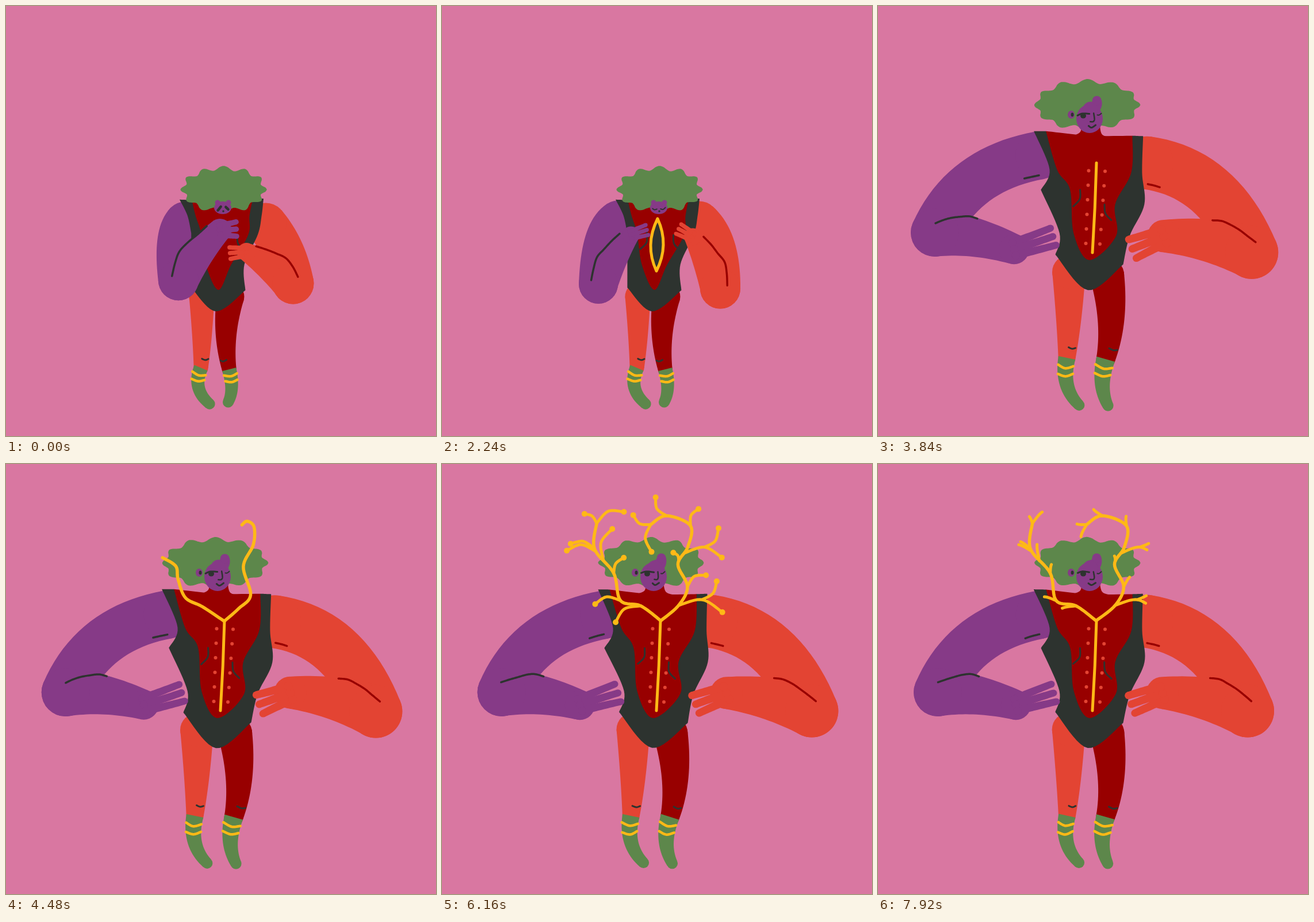
Recreate the animation shown at these times as an HTML page with a canvas. Size 748 px wide and 748 px high, loop 8 s.

```html
<!DOCTYPE html>
<html lang="en">
<head>
<meta charset="utf-8">
<title>Unzipped</title>
<style>
html, body { margin: 0; width: 100%; height: 100%; overflow: hidden; background: #d977a1; }
canvas { display: block; width: 100vw; height: 100vh; }
</style>
</head>
<body>
<canvas id="stage" width="748" height="748"></canvas>
<script>
const ctx = document.getElementById('stage').getContext('2d');
const PINK = '#d977a1', GREEN = '#5d874b', PURPLE = '#863a87', ORANGE = '#e34433',
  RED = '#980000', DARK = '#2d332f', YELLOW = '#ffb916';
const LOOP = 8000, STEP = 80;

const clamp = (v, a = 0, b = 1) => Math.min(b, Math.max(a, v));
const ramp = (t, a, b) => clamp((t - a) / (b - a));
const mix = (a, b, u) => a + (b - a) * u;
const mixPt = (a, b, u) => [mix(a[0], b[0], u), mix(a[1], b[1], u)];
const add = (a, b, k = 1) => [a[0] + b[0] * k, a[1] + b[1] * k];
const dir = angle => [Math.cos(angle), Math.sin(angle)];
const angleTo = (a, b) => Math.atan2(b[1] - a[1], b[0] - a[0]);
const range = (n, f) => Array.from({ length: n }, (_, i) => f(i));
const pts = s => s.split(' ').map(w => w.split(',').map(Number));
const poses = (...list) => list.map(pts);

// Poses: 0 hugging, 1 opening, 2 rising, 3 hands on hips
const hold = (a, c, d) => poses(a, a, c, d);

// hair centre, hair radii, face centre, face radii
const head = hold('379,319 71,37 377,351 15,11', '369,199 88,41 371,224 23,25', '364,172 88,41 368,196 23,25');
// left and right of shoulder, armpit, bust, waist, hip; then crotch
const torso = hold(
  '302,337 448,335 316,365 444,365 322,395 438,398 323,450 415,450 322,490 416,495 365,531',
  '291,262 464,259 300,310 459,305 301,350 452,345 309,405 430,405 307,457 425,463 366,508',
  '271,218 461,226 298,285 460,290 283,320 463,345 316,395 438,400 308,432 427,450 365,494');
// shoulder, bend, elbow, wrist, fingertips, (arm radius, wrist radius)
const armL = poses('312,375 290,398 300,477 372,390 401,388 35,20', '306,372 275,392 272,484 328,398 357,390 34,15',
  '292,304 213,324 210,455 300,340 328,331 44,20', '282,262 151,286 104,397 240,419 306,398 42,26');
const armR = poses('452,378 488,420 500,482 418,428 390,430 36,16', '447,374 485,407 484,492 436,402 412,388 35,15',
  '466,302 520,340 513,467 440,346 408,332 43,21', '468,274 588,292 643,430 495,398 441,418 46,28');
// hip, knee, ankle, heel, toe, (hip radius, ankle radius)
const legL = hold('341,505 342,575 339,629 323,666 354,692 22,12.5', '331,480 331,555 333,611 321,664 349,693 30,14.5',
  '332,462 333,550 329,612 318,663 350,694 29,15');
const legR = hold('391,505 376,572 388,632 398,668 387,689 24,12.5', '395,482 376,555 389,616 406,666 386,692 30,14.5',
  '398,468 414,549 396,614 382,661 400,695 30,16.5');
const zip = poses('374,415 374,415 0,0', '375,370 373,461 11,0', '378,298 371,437 0,0', '380,273 373,429 0,0');

// Each trunk bends from its sprouting to its grown form; twigs are [place, side, length]
const antlers = [
  { trunk: poses('380,273 342,248 312,233 299,200 295,178 272,163', '380,273 345,247 310,237 299,190 265,147 269,103'),
    twigs: [[1, -1, 51], [2, -1, 44], [3, 1, 32], [3.5, 1, 58], [3.9, -1, 50], [4, -1, 42], [5, -1, 27], [5, 1, 52]] },
  { trunk: poses('380,273 404,252 425,228 413,178 430,140 431,110 420,100 411,106',
      '380,273 412,246 427,213 411,175 428,145 432,107 390,90 363,105'),
    twigs: [[1, 1, 76], [2, 1, 38], [3.2, -1, 18], [3.7, 1, 64], [5, 1, 32], [6, 1, 37], [7, 1, 35], [7, -1, 48]] }];

// [time, pose, easing into it]
const soft = u => u * u * (3 - 2 * u), speedUp = u => u ** 1.6, slowDown = u => 1 - (1 - u) ** 2;
const opening = [2640, 1, soft];
const bodyKeys = [[1360, 0], [2160, 1, soft], opening, [3360, 2, speedUp], [3680, 3, slowDown]];
const armKeys = first => [[first, 0], [2200, 1, soft], opening, [3360, 2, speedUp], [3840, 3.05, soft], [4000, 3, soft]];
const armLKeys = armKeys(1360), armRKeys = armKeys(1600);

function poseAt(t, keys) {
  let [t0, v0] = keys[0];
  for (const [t1, v1, ease] of keys.slice(1)) {
    if (t < t1) return mix(v0, v1, ease(ramp(t, t0, t1)));
    [t0, v0] = [t1, v1];
  }
  return v0;
}

function morph(list, p) {
  const i = clamp(Math.floor(p), 0, list.length - 2);
  return list[i].map((a, k) => mixPt(a, list[i + 1][k], p - i));
}

// Hand-drawn shiver of every outline
let phase = 0;
const wobble = ([x, y]) => [
  x + 0.6 * Math.sin(x * 0.13 + y * 0.07 + phase),
  y + 0.5 * Math.sin(y * 0.11 - x * 0.09 + phase * 1.7)];

// Point at place v of a smooth curve through all points of the line
function along(line, v) {
  const n = line.length - 1, i = clamp(Math.floor(v), 0, n - 1), u = clamp(v - i);
  const [a, b, c, d] = [-1, 0, 1, 2].map(k => line[clamp(i + k, 0, n)]);
  return [0, 1].map(j => b[j] + u / 2 * (c[j] - a[j] +
    u * (2 * a[j] - 5 * b[j] + 4 * c[j] - d[j] + u * (3 * (b[j] - c[j]) + d[j] - a[j]))));
}

// Closed outline made of smooth runs that meet in corners
function fill(color, ...runs) {
  ctx.beginPath();
  for (const run of runs) {
    const line = run.map(wobble);
    ctx.lineTo(...line[0]);
    for (let v = 0.1; v < line.length - 0.95; v += 0.1) ctx.lineTo(...along(line, v));
  }
  ctx.fillStyle = color;
  ctx.fill();
}

// Strokes the first part of a curve and returns its end
function stroke(line, color, width, part = 1) {
  const s = line.map(wobble), end = part * (s.length - 1), count = Math.ceil(end * 10);
  ctx.beginPath();
  for (let k = 0; k <= count; k++) ctx.lineTo(...along(s, Math.min(k / 10, end)));
  ctx.strokeStyle = color;
  ctx.lineWidth = width;
  ctx.stroke();
  return along(s, end);
}

function disc([x, y], rx, color, ry = rx) {
  ctx.beginPath();
  ctx.ellipse(x, y, rx, ry, 0, 0, Math.PI * 2);
  ctx.fillStyle = color;
  ctx.fill();
}

// A tapered curve: returns the point at t, moved sideways by a share of the radius
function bone(a, k, b, ra, rb) {
  [a, k, b] = [a, k, b].map(wobble);
  return (t, side = 0) => {
    const p = mixPt(a, k, t), q = mixPt(k, b, t), r = mix(ra, rb, t) * side;
    return add(mixPt(p, q, t), dir(angleTo(p, q) + Math.PI / 2), r);
  };
}

function drawBone(at, color, flat) {
  const edge = side => range(21, i => at(i / 20, side));
  ctx.beginPath();
  [...edge(1), ...edge(-1).reverse()].forEach(p => ctx.lineTo(...p));
  ctx.fillStyle = color;
  ctx.fill();
  for (const t of flat ? [1] : [0, 1]) {
    const c = at(t), e = at(t, 1);
    disc(c, Math.hypot(e[0] - c[0], e[1] - c[1]), color);
  }
}

function drawLeg(p, leg, color, kneeSide) {
  const [hip, knee, ankle, heel, toe, [wide, thin]] = morph(leg, p);
  const limb = bone(hip, knee, ankle, wide, thin), sock = bone(ankle, heel, toe, thin, 9.5);
  drawBone(limb, color);
  stroke([0.1, 0.5, 0.85].map((s, i) => add(limb(0.86, -kneeSide * s), [0, i % 2 * 2])), DARK, 3);
  drawBone(sock, GREEN, true);
  for (const t of [0.13, 0.29]) stroke([sock(t, 0.95), sock(t + 0.05), sock(t, -0.95)], YELLOW, 4.5);
}

function makeArm(p, poseList, side) {
  const [shoulder, bend, elbow, wrist, tip, [wide, thin]] = morph(poseList, p);
  const middle = mixPt(mixPt(elbow, wrist, 0.5), bend, 0.1);
  return { p, side, wrist, tip, gap: thin * 0.6,
    upper: bone(shoulder, bend, elbow, wide, wide), fore: bone(elbow, middle, wrist, wide, thin) };
}

function drawUpper({ p, side, upper }, color, ink) {
  drawBone(upper, color);
  const part = ramp(p, 2.6, 3);
  if (part) stroke([0.03, 0.09, 0.14].map(t => upper(t, side * 0.8)), ink, 3.5, part);
}

function drawForearm({ p, side, wrist, tip, gap, fore }, color, ink) {
  drawBone(fore, color);
  const across = dir(angleTo(wrist, tip) + Math.PI / 2);
  for (const k of [-1, 0, 1]) {
    const from = add(wrist, across, k * gap * 0.7), to = add(tip, across, k * gap);
    drawBone(bone(from, mixPt(from, to, 0.5), to, gap * 0.45, gap * 0.38), color);
  }
  const reach = mix(0.9, 0.5, clamp(p - 2));
  stroke(range(6, i => {
    const t = reach * i / 5;
    return fore(t, side * Math.min(0.97, 0.4 + 1.5 * t));
  }), ink, 3.5);
}

function drawZip(p) {
  if (p < 0.03) return;
  const [top, end, [w]] = morph(zip, p), [mx, my] = mixPt(top, end, 0.5);
  const bow = 1.5 * ramp(p, 1, 2);
  ctx.beginPath();
  ctx.moveTo(...top);
  ctx.quadraticCurveTo(mx + bow + 2 * w, my, ...end);
  ctx.quadraticCurveTo(mx + bow - 2 * w, my, ...top);
  ctx.fillStyle = DARK;
  ctx.fill();
  ctx.strokeStyle = YELLOW;
  ctx.lineWidth = 5;
  ctx.stroke();
}

function drawBody(p) {
  const [shL, shR, pitL, pitR, bustL, bustR, waistL, waistR, hipL, hipR, crotch] = morph(torso, p);
  const inset = (pt, by) => add(pt, [by, 0]);
  const deep = 17 * Math.max(1, p);
  const neckL = inset(shL, 21), neckR = inset(shR, -18), cupL = inset(bustL, deep), cupR = inset(bustR, -deep);
  const navel = add(mixPt(hipL, hipR, 0.5), [0, 1]), collar = add(mixPt(neckL, neckR, 0.5), [0, 4]);
  fill(DARK, [shL, neckL], [neckL, add(collar, [0, 40]), neckR], [neckR, shR],
    [shR, pitR, bustR, waistR, hipR], [hipR, crotch, hipL], [hipL, waistL, bustL], [bustL, pitL, shL]);
  fill(RED, [neckL, collar, neckR],
    [neckR, inset(pitR, -20), cupR, inset(waistR, -24), navel, inset(waistL, 24), cupL, inset(pitL, 14), neckL]);
  for (const [cup, s] of [[cupL, 1], [cupR, -1]]) {
    stroke([[18, 0], [17, 16], [6, 28]].map(([x, y]) => add(cup, [x * s, y])), DARK, 3);
  }
  for (let i = 0; i < 6; i++) {
    const r = 3 * (i ? ramp(p, 1.6, 2) : ramp(p, 2.3, 2.7));
    const y = mix(299.5 + 24.5 * i, 286.5 + 25.3 * i, p - 2);
    disc([366.5 - i, y], r, ORANGE);
    disc([395 - 1.8 * i, y + 1], r, ORANGE);
  }
  drawZip(p);
  return collar[1];
}

function drawHair([c, [rx, ry]]) {
  const lobes = range(73, i => {
    const a = i / 72 * Math.PI * 2, puff = 4 * Math.cos(12 * a), [x, y] = dir(a);
    return add(c, [(rx + puff) * x, (ry + puff) * y]);
  });
  fill(GREEN, lobes);
}

function drawNeck(x, y) {
  fill(RED, [[x - 16, y - 26], [x - 17, y - 6], [x - 42, y + 3]], [[x - 42, y + 8], [x + 42, y + 8]],
    [[x + 42, y + 3], [x + 21, y - 3], [x + 16, y - 26]]);
}

function drawFace(p, [, , c, [rx, ry]]) {
  const ink = (s, w) => stroke(pts(s), DARK, w);
  ctx.save();
  ctx.translate(...c);
  disc([0, 0], rx, PURPLE, ry);
  if (p < 1.5) {
    disc([-9, -9], 4.5, PURPLE);
    disc([10, -9], 4.5, PURPLE);
    if (p < 0.5) {
      ink('-8,4 -3,-2', 4.5);
      ink('5,-1 9,3', 4.5);
    } else {
      ink('-10,1 -7,3 -3,2', 2);
      ink('3,2 7,3 11,0', 2);
    }
    disc([1, 6], 1.8, DARK);
  } else {
    const size = rx / 23;
    ctx.scale(size, size);
    drawBone(bone([2, -16], [14, -22], [13, -32], 13, 8), PURPLE);
    disc([-32, -7], 6, PURPLE, 7);
    disc([-30, -7], 2.5, DARK, 3.5);
    ink('-21,-6 -12,-9 0,-8', 3);
    disc([-11, -5], 5, DARK, 4.5);
    ink('13,-6 16,-6 20,-9', 2);
    ink('7,-9 8,1 6,5 1,5', 2.5);
    ink('-2,12 3,15 10,11', 3);
  }
  ctx.restore();
}

// A twig leaves along the heading and curls to one side
function drawTwig(from, heading, side, length, part, bud) {
  const way = heading + side * 1.05, tip = add(from, dir(way), length);
  const middle = add(mixPt(from, tip, 0.5), add(dir(heading), dir(way), -0.5), length * 0.25);
  const forked = length > 60, shown = forked ? Math.min(1, part * 1.5) : part;
  const end = stroke([from, middle, tip], YELLOW, 5, shown);
  if (bud > 0) disc(end, bud, YELLOW);
  if (forked && shown > 0.5) drawTwig(middle, way, -side, 41, shown * 2 - 1, bud);
}

function drawAntlers(t) {
  const grown = ramp(t, 4080, 4480), bend = soft(ramp(t, 4480, 4960));
  const part = ramp(t, 4640, 5120) - 0.55 * ramp(t, 7360, 7920);
  const bud = 5 * Math.min(ramp(t, 5000, 5280), 1 - ramp(t, 7120, 7840));
  if (!grown) return;
  for (const { trunk, twigs } of antlers) {
    const line = morph(trunk, bend);
    stroke(line, YELLOW, 5.5, grown);
    if (part <= 0) continue;
    for (const [place, side, length] of twigs) {
      const heading = angleTo(along(line, place - 0.05), along(line, place + 0.05));
      drawTwig(along(line, place), heading, side, length, part, bud);
    }
  }
}

function draw(t) {
  phase = (t / STEP % 4) * 1.9;
  const p = poseAt(t, bodyKeys), look = morph(head, p), risen = p > 1.6;
  const left = makeArm(poseAt(t, armLKeys), armL, -1), right = makeArm(poseAt(t, armRKeys), armR, 1);
  ctx.fillStyle = PINK;
  ctx.fillRect(0, 0, 748, 748);
  drawLeg(p, legL, ORANGE, 1);
  drawLeg(p, legR, RED, p > 2.5 ? 1 : -1);
  if (risen) drawHair(look);
  drawUpper(left, PURPLE, DARK);
  drawUpper(right, ORANGE, RED);
  const collarY = drawBody(p);
  if (risen) drawNeck(look[2][0] + 1, collarY);
  else drawHair(look);
  drawFace(p, look);
  drawForearm(left, PURPLE, DARK);
  drawForearm(right, ORANGE, RED);
  drawAntlers(t);
}

ctx.lineCap = ctx.lineJoin = 'round';
const start = performance.now();
function tick() {
  const t = (performance.now() - start) % LOOP;
  draw(Math.floor(t / STEP) * STEP);
  requestAnimationFrame(tick);
}
tick();
</script>
</body>
</html>
```
